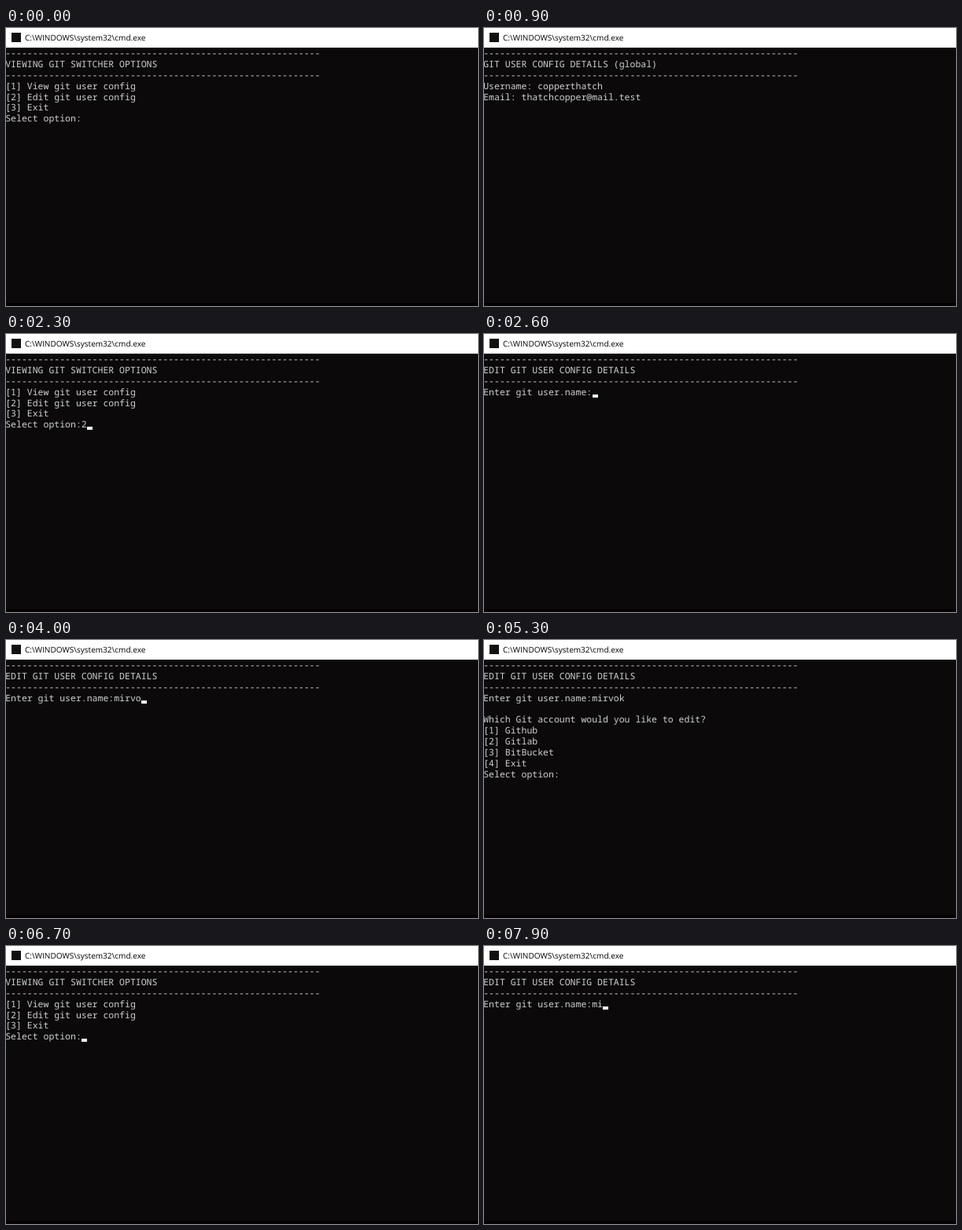
These frames come from a looping animation (600 by 354 pixels, 8 s). An HTML page:

```html
<!DOCTYPE html>
<html lang="en">
<head>
<meta charset="utf-8">
<title>Git user switcher</title>
<style>
  html, body { margin: 0; width: 100%; height: 100%; overflow: hidden; background: #0b090a; }
  body { position: relative; text-rendering: geometricPrecision; }
  header { position: absolute; inset: 0 0 auto; height: 25px; background: #fff; }
  header i { position: absolute; left: 7px; top: 6px; width: 12px; height: 12px; background: #111; }
  header span { position: absolute; left: 24px; top: 0; color: #000;
    font: 10.05px/25px "Open Sans", sans-serif; white-space: nowrap; }
  pre { position: absolute; left: -0.8px; top: 26.4px; margin: 0; color: #d0d0d0;
    font: 11.51px/13.82px "Noto Sans Mono", monospace; font-variant-ligatures: none; }
  #cursor { position: absolute; width: 7px; height: 4px; background: #f2f2f2; }
  footer { position: absolute; inset: 350px 0 0; background: #050103; }
</style>
</head>
<body>
<header><i></i><span>C:\WINDOWS\system32\cmd.exe</span></header>
<pre id="screen"></pre>
<div id="cursor"></div>
<footer></footer>
<script>
const LOOP = 8000, COL = 6.906, ROW = 13.82;
const rule = '-'.repeat(58);
const user = 'mirvok';
const proceed = '\nPress Enter to continue...\n';

const page = (title, ...lines) => [rule, title, rule, ...lines].join('\n');

const menu = (key = '') => page('VIEWING GIT SWITCHER OPTIONS',
  '[1] View git user config', '[2] Edit git user config', '[3] Exit', 'Select option:' + key);

const details = count => page('GIT USER CONFIG DETAILS (global)', ...[
  'Username: copperthatch', 'Email: thatchcopper@mail.test',
  'GPG Key: D4180927C6351EBB', proceed].slice(0, count));

const edit = (typed, ...more) => page('EDIT GIT USER CONFIG DETAILS',
  'Enter git user.name:' + user.slice(0, typed), ...more);

const pick = (key, ...more) => edit(6, '', 'Which Git account would you like to edit?',
  '[1] Github', '[2] Gitlab', '[3] BitBucket', '[4] Exit', 'Select option:' + key, ...more);

const saved = 'Successfully updated the global git user config for the Github account.';

// [start ms, screen text, cursor shown]
const steps = [
  [0, menu(), 0], [300, menu('1'), 1],
  [500, details(0), 0], [600, details(1), 0], [800, details(2), 0],
  [1000, details(3), 0], [1100, details(4), 0], [1700, details(4), 1],
  [1800, menu(), 1], [2300, menu('2'), 1],
  [2600, edit(0), 1], [3200, edit(1), 1], [3500, edit(3), 1], [3700, edit(4), 1],
  [4000, edit(5), 1], [4100, edit(6), 1], [4200, edit(6), 0],
  [4400, pick(''), 0], [4500, pick(''), 1], [5300, pick(''), 0], [5500, pick('1'), 1],
  [5800, pick('1', saved), 0], [5900, pick('1', saved, proceed), 0], [6600, pick('1', saved, proceed), 1],
  [6700, menu(), 1], [7300, menu('2'), 1],
  [7400, edit(0), 1], [7700, edit(1), 1], [7900, edit(2), 1]
];

const screenEl = document.getElementById('screen');
const cursorEl = document.getElementById('cursor');
const begin = performance.now();
let shown;

function draw() {
  const t = Math.max(0, performance.now() - begin) % LOOP;
  const step = steps.findLast(s => s[0] <= t);
  if (step !== shown) {
    shown = step;
    const [, text, on] = step;
    const lines = text.split('\n');
    screenEl.textContent = text;
    cursorEl.hidden = !on;
    cursorEl.style.left = Math.round(lines.at(-1).length * COL - 0.6) + 'px';
    cursorEl.style.top = Math.floor(35.6 + (lines.length - 1) * ROW) + 'px';
  }
  requestAnimationFrame(draw);
}
draw();
</script>
</body>
</html>
```
